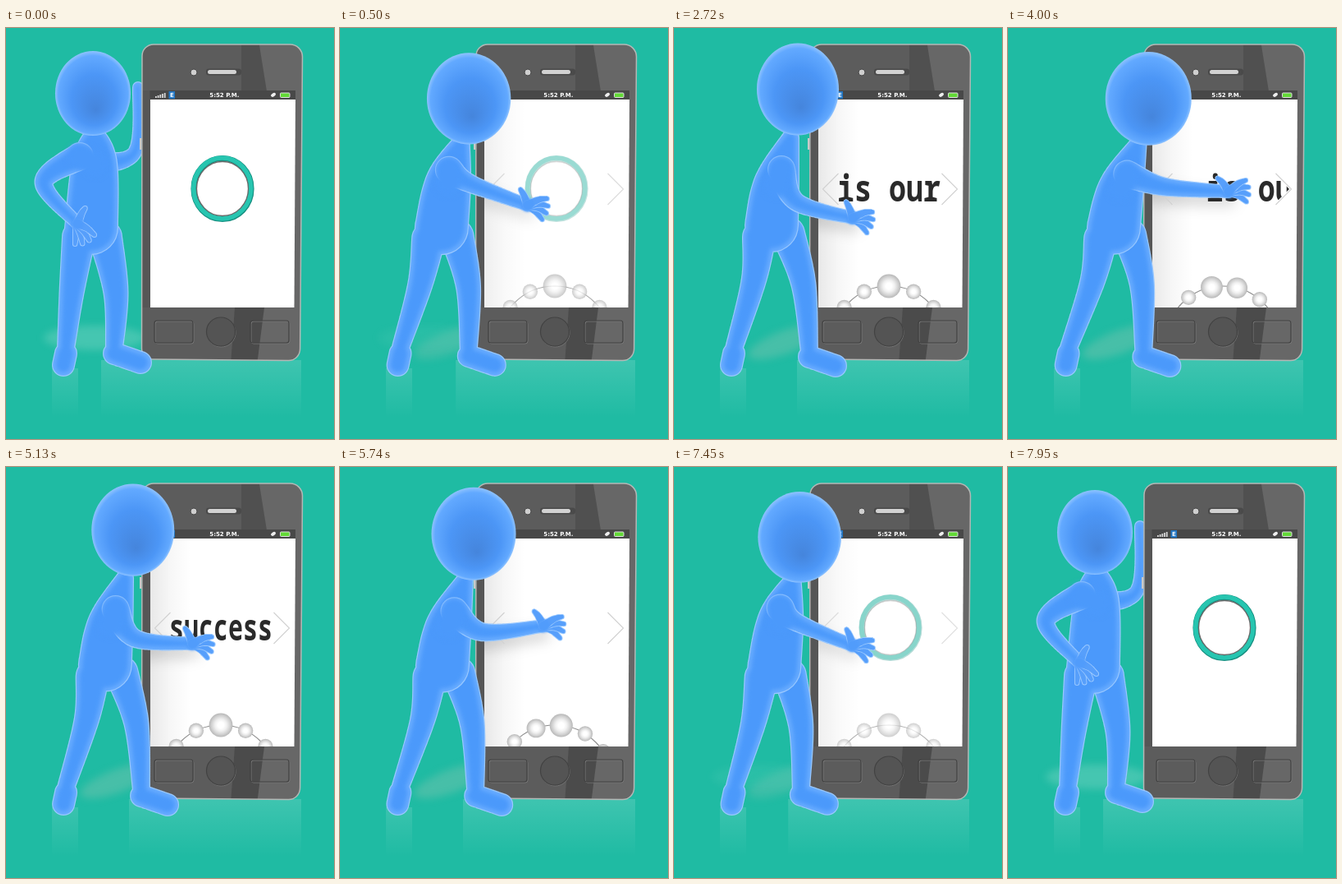
An HTML page with a canvas that plays this animation: 400 px wide and 500 px high, repeating every 8000 ms.

```html
<!DOCTYPE html>
<html lang="en">
<head>
<meta charset="utf-8">
<title>Swipe</title>
<style>
  html, body { margin: 0; width: 100%; height: 100%; overflow: hidden; background: #1fbba3; }
  canvas { display: block; width: 100vw; height: 100vh; }
</style>
</head>
<body>
<canvas id="stage" width="400" height="500"></canvas>
<script>
const ctx = document.getElementById('stage').getContext('2d');
const LOOP = 8000, CYCLE = 1600, CYCLES = 4;
const WORDS = ['', 'Your success', 'is our', 'success', ''];
const ARRIVE = { start: 100, length: 520, steps: 6 };
const LEAVE = { start: 7220, length: 730, steps: 8 };
const swipe = i => ({ start: 800 + i * CYCLE, length: 320, steps: 4 });
const reachOut = i => ({ start: 1930 + i * CYCLE, length: 320, steps: 4 });

// Joint positions; aim is the direction of the hand in degrees.
const IDLE = {
  head: [106, 79.5], size: [46, 51.5], neck: [108, 128], chest: [108, 165], hips: [104, 243],
  shoulder: [90, 156], elbow: [46, 188], palm: [87, 238], aim: [65],
  hipL: [89, 254], kneeL: [80, 322], ankleL: [73, 390],
  hipR: [121, 254], kneeR: [134, 322], ankleR: [132, 390]
};
const REST = {
  head: [151, 74.5], size: [50, 56], neck: [142, 134], chest: [125, 190], hips: [119, 240],
  shoulder: [131, 172], elbow: [150, 212], palm: [218, 231], aim: [15],
  hipL: [104, 254], kneeL: [97, 308], ankleL: [73, 390],
  hipR: [139, 250], kneeR: [158, 312], ankleR: [165, 394]
};

const smooth = u => u * u * (3 - 2 * u);
const mix = (a, b, k) => a.map((v, i) => v + (b[i] - v) * k);
const offset = ([x, y], dx, dy) => [x + dx, y + dy];
const polar = ([x, y], degrees, r) =>
  [x + r * Math.cos(degrees * Math.PI / 180), y + r * Math.sin(degrees * Math.PI / 180)];

function stepped(t, { start, length, steps }) {
  if (t < start) return 0;
  const i = Math.floor((t - start) / length * (steps - 1) + 0.001);
  return Math.min(steps, i + 1) / steps;
}

// Leaning moves each joint by its height above the floor.
function poseAt({ reach, idle }) {
  const pose = {};
  for (const name in REST) {
    let joint = REST[name];
    if (joint.length === 2 && name !== 'size') {
      const height = Math.max(0, (400 - joint[1]) / 325);
      joint = offset(joint, 24 * reach * height, 13.5 * reach * height ** 2);
    }
    pose[name] = joint;
  }
  pose.size = offset(pose.size, 3 * reach, reach);
  pose.elbow = offset(pose.elbow, 34 * reach, -27 * reach);
  pose.palm = offset(pose.palm, 48 * reach, -27 * reach - 26 * Math.sin(Math.PI * reach));
  pose.aim = [15 - 20 * reach];
  for (const name in pose) pose[name] = mix(pose[name], IDLE[name], idle);
  pose.farElbow = mix(pose.chest, [157, 151], idle);
  pose.farHand = mix(pose.chest, [161, 72], idle);
  return pose;
}

// A limb is a chain of [x, y, radius] made from joints and radii.
const limb = (joints, radii) => joints.map((joint, i) => [...joint, radii[i]]);

function spline(a, b, c, d, u) {
  return b + u * (c - a + u * (2 * a - 5 * b + 4 * c - d + u * (3 * (b - c) + d - a))) / 2;
}

function trace(chain, inset) {
  const at = i => chain[Math.max(0, Math.min(chain.length - 1, i))];
  for (let i = 0; i < chain.length - 1; i++) {
    for (let s = 0; s <= 40; s++) {
      const [x, y, r] = [0, 1, 2].map(k =>
        spline(at(i - 1)[k], at(i)[k], at(i + 1)[k], at(i + 2)[k], s / 40));
      const size = Math.max(r * 0.35, r - inset);
      ctx.moveTo(x + size, y);
      ctx.arc(x, y, size, 0, Math.PI * 2);
    }
  }
}

function fillLimbs(limbs, inset, color, blur = 0) {
  ctx.save();
  if (blur) ctx.filter = `blur(${blur}px)`;
  ctx.fillStyle = color;
  ctx.beginPath();
  limbs.forEach(chain => trace(chain, inset));
  ctx.fill();
  ctx.restore();
}

function skin(...limbs) {
  fillLimbs(limbs, 0, '#9ccaff');
  fillLimbs(limbs, 1.2, '#68acff');
  fillLimbs(limbs, 5, '#4b99fb', 2.5);
}

function fill(color) {
  ctx.fillStyle = color;
  ctx.fill();
}

function stroke(color, width = 1) {
  ctx.strokeStyle = color;
  ctx.lineWidth = width;
  ctx.stroke();
}

function rect(x, y, w, h, color) {
  ctx.fillStyle = color;
  ctx.fillRect(x, y, w, h);
}

function rounded(x, y, w, h, r) {
  ctx.beginPath();
  ctx.roundRect(x, y, w, h, r);
}

function ellipse(x, y, rx, ry = rx, tilt = 0) {
  ctx.beginPath();
  ctx.ellipse(x, y, rx, ry, tilt, 0, Math.PI * 2);
}

function polygon(...points) {
  ctx.beginPath();
  points.forEach(([x, y]) => ctx.lineTo(x, y));
  ctx.closePath();
}

function gradient(x0, y0, x1, y1, ...colors) {
  const g = ctx.createLinearGradient(x0, y0, x1, y1);
  colors.forEach((c, i) => g.addColorStop(i / (colors.length - 1), c));
  return g;
}

function drawFloor(idle) {
  rect(0, 0, 400, 500, '#1fbba3');
  const sheen = gradient(0, 404, 0, 474, 'rgba(255,255,255,.14)', 'rgba(255,255,255,0)');
  const left = 150 - 34 * idle;
  rect(left, 404, 360 - left, 70, sheen);
  rect(56, 414, 32, 60, sheen);
  ctx.save();
  ctx.filter = 'blur(5px)';
  ellipse(108, 377, 62, 15);
  fill(`rgba(190,235,220,${0.24 * idle})`);
  ellipse(136, 382, 48, 14, -0.35);
  fill(`rgba(150,200,180,${0.34 * (1 - idle)})`);
  ctx.restore();
}

function drawStatus() {
  rect(175.5, 76, 177.5, 11, '#484848');
  for (let i = 0; i < 5; i++) rect(182 + i * 2.7, 83 - i, 1.8, 2 + i, '#d5d5d5');
  rect(198.5, 77, 7.5, 9, '#2377c4');
  ctx.fillStyle = '#fff';
  ctx.textAlign = 'center';
  ctx.font = 'bold 7px "DejaVu Sans", sans-serif';
  ctx.fillText('E', 202.3, 84);
  ctx.fillText('5:52 P.M.', 266.3, 84);
  ellipse(326, 81.3, 3.2, 2, -0.6);
  fill('#eee');
  rounded(334.5, 79, 11.5, 5.5, 1);
  fill('#62d936');
  stroke('#ddd');
}

function tracePhone() {
  ctx.beginPath();
  ctx.moveTo(180, 20);
  ctx.arcTo(361.5, 20, 361.5, 38, 15);
  ctx.arcTo(358.5, 404.5, 344, 404.5, 14);
  ctx.arcTo(165.5, 403, 165.5, 388, 13);
  ctx.arcTo(166, 20, 180, 20, 14);
  ctx.closePath();
}

function drawPhone() {
  tracePhone();
  fill('#676767');
  ctx.save();
  ctx.clip();
  rect(160, 15, 127, 62, '#5c5c5c');
  polygon([287, 15], [308, 15], [318, 77], [287, 77]);
  fill('#505050');
  rect(160, 76, 16, 264, '#565656');
  rect(160, 340, 120, 70, '#5c5c5c');
  polygon([279, 340], [315, 340], [306, 410], [274, 410]);
  fill('#4b4b4b');
  ctx.restore();
  tracePhone();
  stroke('#b4b8b6', 1.5);
  rect(163, 134, 2, 14, '#c9c9c9');

  ellipse(229, 54, 4);
  fill('#cfcfcf');
  stroke('#474747');
  rounded(244, 49.5, 43, 8, 3);
  fill('#4a4a4a');
  rounded(246, 51, 35, 5, 2.5);
  fill('#d2d2d2');

  for (const x of [181, 298]) {
    rounded(x + 1, 357, 47, 27, 3);
    stroke('#777');
    rounded(x, 356, 47, 27, 3);
    stroke('#424242', 1.2);
  }
  ellipse(262.5, 370.5, 17.5);
  stroke('#747474');
  ellipse(262, 369.5, 17.5);
  fill('#545454');
  stroke('#424242', 1.2);
  drawStatus();
}

function drawRing() {
  ellipse(264, 195.5, 35, 37);
  stroke('#168f80', 7.2);
  ellipse(263.7, 195, 35, 37);
  stroke('#27c5b0', 5.6);
  ellipse(264, 195.5, 31.5, 33);
  stroke('#696969', 1.3);
}

function drawCarousel(shift) {
  ellipse(262, 384, 70);
  stroke('#8c8c8c', 1.2);
  for (let i = -3; i <= 4; i++) {
    const slot = i - shift;
    const [x, y] = polar([262, 384], slot * 25.5 - 90, 70);
    const r = 9.2 + 5.2 * Math.max(0, 1 - slot * slot);
    const ball = ctx.createRadialGradient(x, y, r * 0.25, x, y, r);
    ['#fff', '#f0f0f0', '#d6d6d6', '#b8b8b8'].forEach((c, k) => ball.addColorStop(k / 3, c));
    ellipse(x, y, r);
    fill(ball);
  }
}

function drawWord(word, slide) {
  for (const side of [-1, 1]) {
    ctx.beginPath();
    for (const dy of [-19, 0, 19]) ctx.lineTo(263.5 + side * (82 - Math.abs(dy)), 196 + dy);
    stroke('#d2d2d2', 1.2);
  }
  ctx.save();
  polygon([180, 196], [204, 172], [320, 172], [343, 196], [320, 219], [204, 219]);
  ctx.clip();
  ctx.fillStyle = '#2a2a2a';
  ctx.textAlign = 'center';
  ctx.font = 'bold 44px "Noto Sans Mono", "DejaVu Sans Mono", monospace';
  ctx.fillText(word, 262 + slide, 211, 126);
  ctx.restore();
}

function drawScreen(arm, scene) {
  ctx.save();
  polygon([176, 87], [353, 87], [351.5, 340], [176, 340]);
  fill('#fff');
  ctx.clip();
  ctx.globalAlpha = scene.idle;
  drawRing();
  ctx.globalAlpha = 1 - scene.idle;
  rect(176, 87, 50, 253, gradient(176, 0, 226, 0, 'rgba(0,0,0,.09)', 'rgba(0,0,0,.03)', 'rgba(0,0,0,0)'));
  ctx.translate(1, 10);
  fillLimbs([arm], 0, 'rgba(0,0,0,.15)', 8);
  ctx.translate(-1, -10);
  drawCarousel(scene.shift);
  drawWord(scene.word, scene.slide);
  ctx.restore();
}

function drawHand(palm, aim) {
  const digit = (angle, length) => {
    const middle = offset(polar(palm, angle, length * 0.55), 0, -2);
    const finger = limb([palm, middle, polar(palm, angle, length)], [6, 4.5, 3.2]);
    fillLimbs([finger], 0, '#9ccaff');
    fillLimbs([finger], 0.9, '#579ffb');
  };
  digit(aim - 128, 21);
  for (let i = 3; i >= 0; i--) digit(aim + (i - 1.5) * 21, 25);
  fillLimbs([limb([palm, palm], [9, 9])], 1, '#519cfb', 1.5);
}

function drawHead([x, y], [rx, ry]) {
  ctx.save();
  ctx.translate(x, y);
  ctx.scale(rx, ry);
  const ball = ctx.createRadialGradient(0.08, 0.4, 0, 0, 0, 1);
  ball.addColorStop(0, '#4585dc');
  ball.addColorStop(0.6, '#4c96f6');
  ball.addColorStop(0.92, '#62a9ff');
  ball.addColorStop(1, '#8fc3ff');
  ellipse(0, 0, 1);
  fill(ball);
  ctx.restore();
}

function drawFigure(pose, arm) {
  const toeL = offset(pose.ankleL, -3, 20), toeR = offset(pose.ankleR, 32, 17);
  const leg = side => limb([pose['hip' + side], pose['knee' + side], pose['ankle' + side]], [21, 15.5, 11]);
  const foot = (ankle, toe) => limb([offset(ankle, 0, 6), toe], [14, 14]);
  skin(leg('R'), foot(pose.ankleR, toeR));
  skin(limb([pose.neck, pose.chest, pose.hips], [11, 28, 33]), leg('L'), foot(pose.ankleL, toeL));
  skin(arm);
  fillLimbs([limb([pose.shoulder, pose.chest], [17, 18])], 2, '#4b99fb', 3);
  drawHand(pose.palm, pose.aim[0]);
  drawHead(pose.head, pose.size);
}

function sceneAt(t) {
  const eased = span => smooth(stepped(t, span));
  const scene = {
    idle: 1 - eased(ARRIVE) + eased(LEAVE),
    reach: 1, shift: 0, slide: 0, word: ''
  };
  for (let i = 0; i < CYCLES; i++) {
    const u = stepped(t, swipe(i));
    scene.reach += eased(reachOut(i)) - smooth(u);
    if (!u) continue;
    const moved = 1 - (1 - u) ** 2;
    scene.shift = moved % 1;
    scene.slide = 76 * (1 - moved);
    scene.word = WORDS[u > 0.25 ? i + 1 : i];
  }
  return scene;
}

let shown = '';
function draw() {
  const scene = sceneAt(performance.now() % LOOP);
  const key = JSON.stringify(scene);
  if (key !== shown) {
    shown = key;
    const pose = poseAt(scene);
    const arm = limb([pose.shoulder, pose.elbow, pose.palm], [17, 11.5, 8]);
    drawFloor(scene.idle);
    skin(limb([pose.chest, pose.farElbow, pose.farHand], [14, 9, 7]));
    drawPhone();
    drawScreen(arm, scene);
    drawFigure(pose, arm);
  }
  requestAnimationFrame(draw);
}
draw();
</script>
</body>
</html>
```
